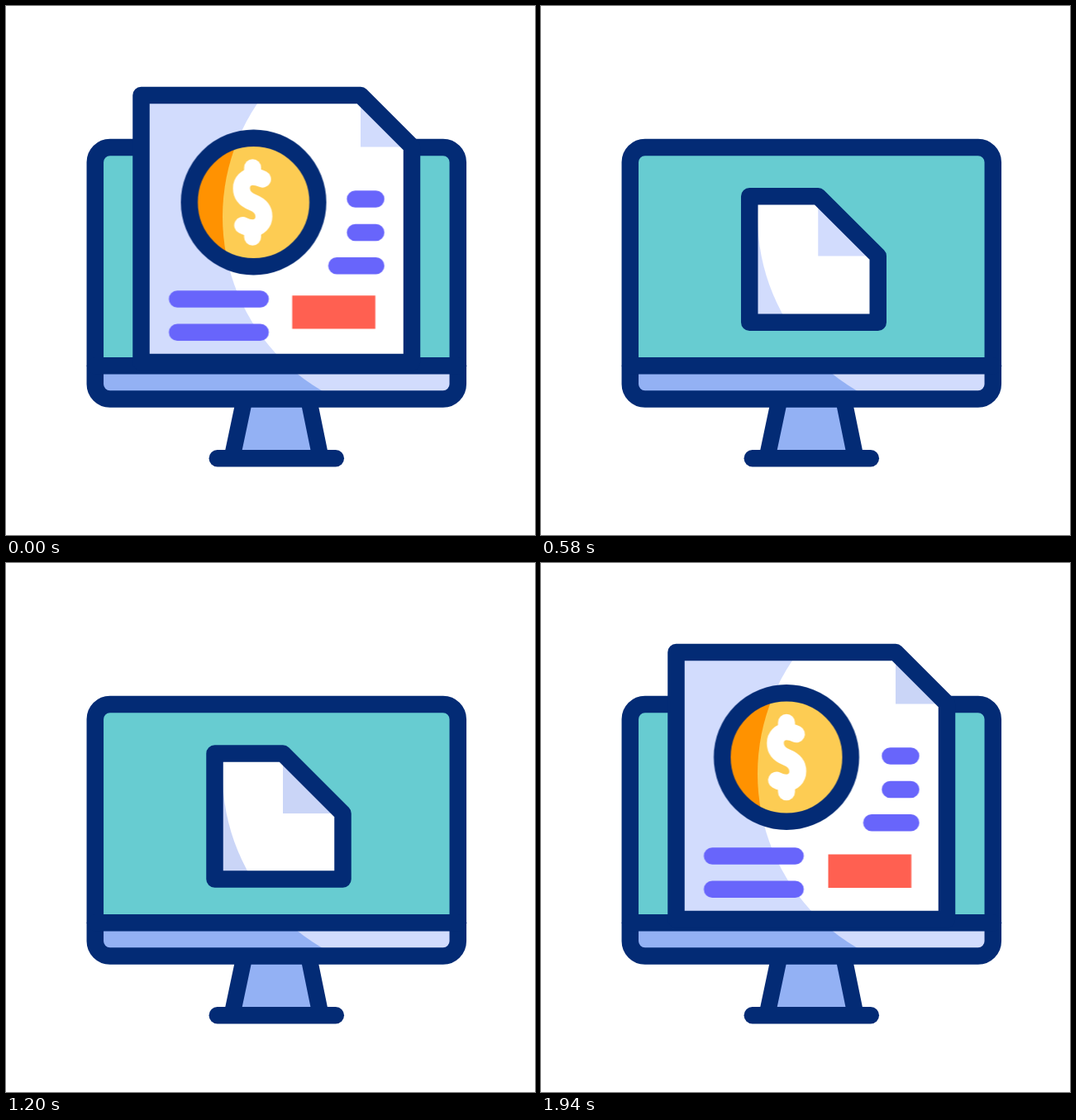
An HTML page without scripts that plays this animation: 640 by 640 pixels, repeating every 2.82 s.

```html
<!DOCTYPE html>
<html lang="en">
<head>
<meta charset="utf-8">
<title>Invoice on screen</title>
<style>
html, body { margin: 0; width: 100%; height: 100%; overflow: hidden; background: #fff; }
svg { display: block; width: 100vw; height: 100vh; }

.line { fill: none; stroke: #032b75; stroke-width: 20.5; stroke-linecap: round; stroke-linejoin: round; }
.bars { fill: none; stroke: #6865fb; stroke-width: 20.5; stroke-linecap: round; }
.sign { fill: none; stroke: #fff; stroke-width: 20.5; stroke-linecap: round; stroke-linejoin: round; }
.keep { vector-effect: non-scaling-stroke; }
.pale { fill: #cad5f7; }

/* smoothstep easing for every move */
.page1, .page2, .fold1, .fold2, .place1, .place2 {
  animation: 2820ms cubic-bezier(.3333, 0, .6667, 1) infinite;
}
.page1 { animation-name: page1; }
.page2 { animation-name: page2; }
.fold1 { animation-name: fold1; }
.fold2 { animation-name: fold2; }
.place1 { animation-name: place1; }
.place2 { animation-name: place2; }
.fade1 { animation: fade1 2820ms linear infinite; }
.fade2 { animation: fade2 2820ms linear infinite; }
.tint { animation: tint 2820ms step-end infinite; }

/* shrink 0-600 ms, slide 800-1200 ms, grow 1300-1900 ms */
@keyframes page1 {
  0% { d: path("M163.5 108H429L491 170V431H163.5Z"); }
  21.277%, 28.369% { d: path("M252.5 230.5H335L407.5 303V382.5H252.5Z"); }
  42.553%, 100% { d: path("M-68 230.5H14.5L87 303V382.5H-68Z"); }
}
@keyframes fold1 {
  0% { d: path("M429 108V170.5H491Z"); }
  21.277%, 28.369% { d: path("M335 230.5V303H407.5Z"); }
  42.553%, 100% { d: path("M14.5 230.5V303H87Z"); }
}
@keyframes page2 {
  0%, 28.369% { d: path("M573 230.5H655.5L728 303V382.5H573Z"); }
  42.553%, 46.099% { d: path("M252.5 230.5H335L407.5 303V382.5H252.5Z"); }
  67.376%, 100% { d: path("M163.5 108H429L491 170V431H163.5Z"); }
}
@keyframes fold2 {
  0%, 28.369% { d: path("M655.5 230.5V303H728Z"); }
  42.553%, 46.099% { d: path("M335 230.5V303H407.5Z"); }
  67.376%, 100% { d: path("M429 108V170.5H491Z"); }
}
@keyframes place1 {
  0% { transform: translate(163.5px, 108px) scale(1); }
  21.277%, 100% { transform: translate(252.5px, 230.5px) scale(.472); }
}
@keyframes place2 {
  0%, 46.099% { transform: translate(252.5px, 230.5px) scale(.472); }
  67.376%, 100% { transform: translate(163.5px, 108px) scale(1); }
}
@keyframes fade1 {
  0% { opacity: 1; }
  17.73%, 100% { opacity: 0; }
}
@keyframes fade2 {
  0%, 49.645% { opacity: 0; }
  67.376%, 100% { opacity: 1; }
}
@keyframes tint {
  0% { fill: #d2dcfd; }
  28.369% { fill: #cad5f7; }
  46.099%, 100% { fill: #d2dcfd; }
}
</style>
</head>
<body>
<svg viewBox="0 0 640 640">
  <defs>
    <!-- the lit area stays put while the pages move through it -->
    <clipPath id="lit"><circle cx="506.5" cy="255" r="244.5"/></clipPath>
    <clipPath id="screen"><path d="M118 0H537V640H118Z"/></clipPath>

    <circle id="disc" cx="133.5" cy="127" r="77.75"/>
    <path id="rows" class="bars keep" d="M259 125.5H284M259 166H284M236.5 206.2H284M43.7 246.5H144.2M43.7 286.8H144.2"/>
    <path id="box" fill="#ff6051" d="M184 244.6h100.6v40.4h-100.6z"/>
    <path id="ess" class="sign keep" d="M145.5 99Q139.5 96 133.5 96C126 96 120 102 120 110C120 119 126 124 133.5 127C141 130 147.2 135 147.2 144C147.2 152 141 158 133.5 158Q127.500 158 121.500 154.800"/>
    <path id="top" class="sign keep" d="M133.500 85V95"/>
    <path id="foot" class="sign keep" d="M133.500 159V169"/>
  </defs>

  <!-- monitor -->
  <path d="M288.400 476L273.400 547H380.700L366.200 476Z" fill="#93b1f4"/>
  <path class="line" style="stroke-width:20;stroke-linecap:butt" d="M288.400 476L273.400 547M366.200 476L380.700 547"/>
  <path class="line" d="M255.800 547.200H398.800"/>
  <rect x="107.800" y="171" width="439" height="304.500" rx="18" fill="#67ccd1"/>
  <path id="chin" d="M108 435H547V465a10 10 0 0 1 -10 10H118a10 10 0 0 1 -10 -10Z" fill="#93b1f4"/>
  <g clip-path="url(#lit)"><use href="#chin" style="display:none"/><path d="M330 435H547V465a10 10 0 0 1 -10 10H330Z" fill="#d2dcfd"/></g>
  <rect class="line" x="107.800" y="171" width="439" height="304.500" rx="18"/>
  <path class="line" d="M108 435.200H547"/>

  <g clip-path="url(#screen)">
    <!-- leaving page -->
    <path class="page1 tint" style="animation-name:page1,tint;animation-duration:2820ms;animation-timing-function:cubic-bezier(.3333,0,.6667,1),step-end;animation-iteration-count:infinite"/>
    <g clip-path="url(#lit)"><path class="page1" fill="#fff"/></g>
    <path style="animation-name:fold1,tint;animation-duration:2820ms;animation-timing-function:cubic-bezier(.3333,0,.6667,1),step-end;animation-iteration-count:infinite"/>
    <g class="fade1">
      <g class="place1"><use href="#disc" x="2.500" y="2.400" fill="#ff9200"/></g>
      <g clip-path="url(#lit)"><g class="place1"><use href="#disc" x="2.500" y="2.400" fill="#fdcc53"/></g></g>
      <g class="place1">
        <circle class="line keep" cx="136" cy="129.400" r="77.750"/>
        <use href="#rows"/>
        <use href="#box" x="-1.300" y="-2.400"/>
      </g>
    </g>
    <g class="place1">
      <g class="fade1"><use href="#ess" x="1.300" y="2.400"/></g>
      <g class="fade1"><use href="#top" x="1.300" y="2.400"/></g>
      <g class="fade1"><use href="#foot" x="1.300" y="2.400"/></g>
    </g>
    <path class="page1 line"/>

    <!-- arriving page -->
    <path style="animation-name:page2,tint;animation-duration:2820ms;animation-timing-function:cubic-bezier(.3333,0,.6667,1),step-end;animation-iteration-count:infinite"/>
    <g clip-path="url(#lit)"><path class="page2" fill="#fff"/></g>
    <path class="fold2 pale"/>
    <g class="fade2">
      <g class="place2"><use href="#disc" fill="#ff9200"/></g>
      <g clip-path="url(#lit)"><g class="place2"><use href="#disc" fill="#fdcc53"/></g></g>
      <g class="place2">
        <circle class="line keep" cx="133.500" cy="127" r="77.750"/>
        <use href="#rows"/>
        <use href="#box"/>
        <use href="#ess"/>
        <use href="#top"/>
        <use href="#foot"/>
      </g>
    </g>
    <path class="page2 line"/>
  </g>
</svg>
</body>
</html>
```
